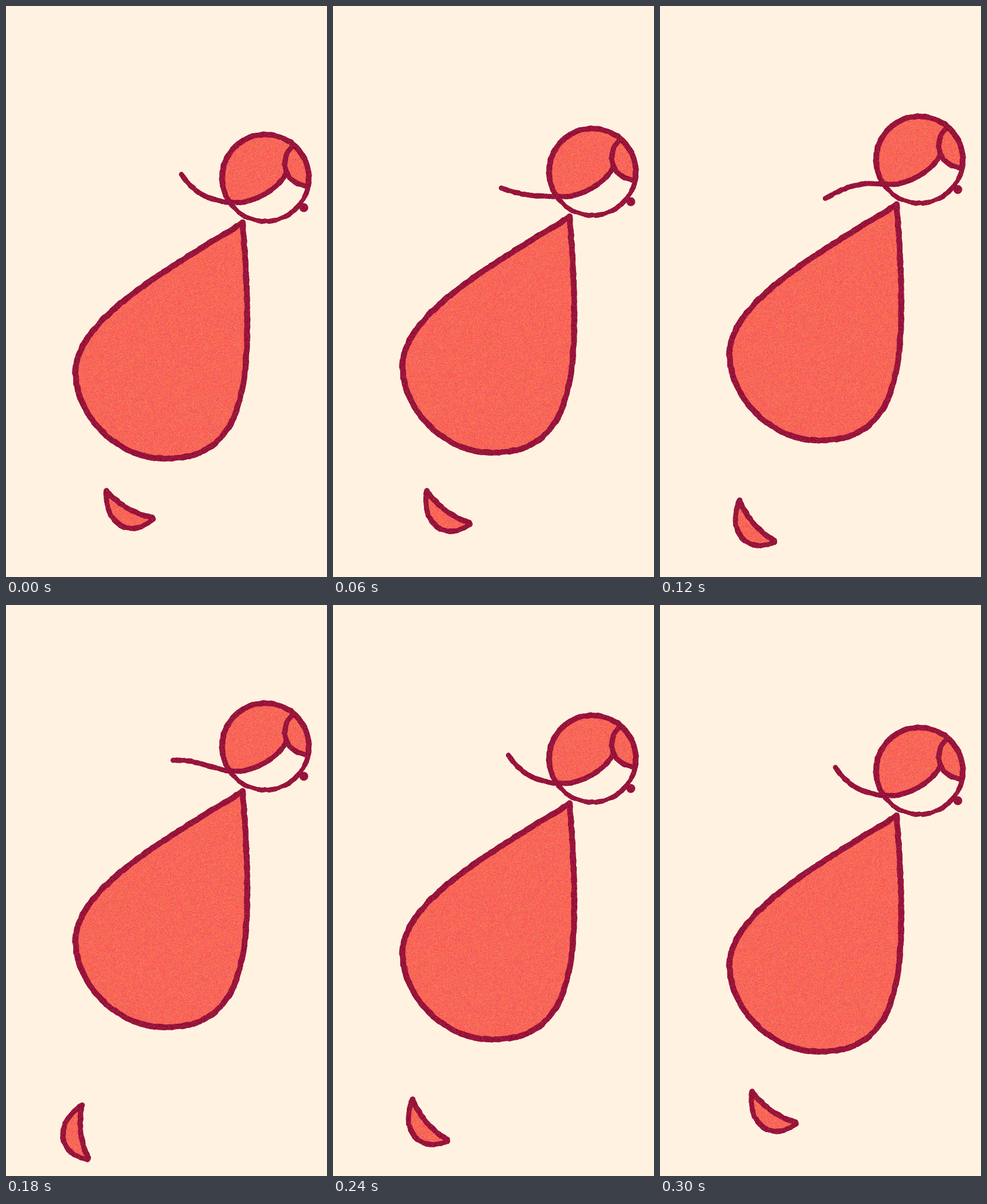
Write an HTML page with a canvas that moves like this. It is 540 px wide and 960 px high and loops after 0.36 s.

```html
<!DOCTYPE html>
<html lang="en">
<head>
<meta charset="utf-8">
<title>Bouncing figure</title>
<style>
  html, body { margin: 0; width: 100%; height: 100%; overflow: hidden; background: #fff2e0; }
  #stage { position: relative; width: 540px; height: 960px; overflow: hidden; }
  #strip { position: absolute; left: 0; top: 0; display: block; }
</style>
</head>
<body>
<div id="stage"><canvas id="strip"></canvas></div>
<script>
const W = 540, H = 960, STEP_MS = 60;
const INK = 'rgb(152,20,60)', FILL = 'rgb(253,102,88)';

// Ponytail curves, relative to the head
const TAIL_UP = 'M295 283 C310 309 340 328 376 330';
const TAIL_FLAT = 'M283 316 C310 327 345 331 376 330';
const TAIL_DOWN = 'M278 354 C310 336 330 326 376 330';
const TAIL_BACK = 'M281 312 C325 311 340 325 376 330';

// lift: height of head and body; foot: x, y, angle in degrees
const POSES = [
  { lift: 0,     tail: TAIL_UP,   foot: [169, 815, 29.4] },
  { lift: -10,   tail: TAIL_FLAT, foot: [158, 815, 36.1] },
  { lift: -30.5, tail: TAIL_DOWN, foot: [134, 831, 48.5] },
  { lift: -51,   tail: TAIL_BACK, foot: [128, 841, 82.5] },
  { lift: -30.5, tail: TAIL_UP,   foot: [134, 831, 48.5] },
  { lift: -10,   tail: TAIL_UP,   foot: [155, 818, 34.4] }
];

const BODY = 'M398 364 C300 428 117 520 117 616 C117 686 184 761 268 761 ' +
  'C372 761 406 690 406 530 C406 470 402 420 398 364 Z';
const HAIR = 'M376 330 A73 73 0 0 1 482 233 C459 258 463 270 470 283 C455 308 420 334 376 330 Z';
const LOCK = 'M482 235 C459 258 465 298 508 303 A73 73 0 0 0 482 235 Z';
const SKULL = 'M376 330 A73 73 0 1 1 508 303';
const CHIN = 'M508 303 A73 73 0 0 1 376 330';
const FRINGE = 'M376 330 C420 334 455 308 470 283';
const PARTING = 'M482 235 C459 258 465 298 508 303';
const FOOT = 'M0 0 C22 50 78 54 92 0 Q46 16 0 0 Z';

const strip = document.getElementById('strip');
strip.width = W * POSES.length;
strip.height = H;
const ctx = strip.getContext('2d', { willReadFrequently: true });
ctx.lineCap = ctx.lineJoin = 'round';

let seed = 1;
function rand() {
  seed = (seed + 0x6d2b79f5) | 0;
  let t = Math.imul(seed ^ (seed >>> 15), 1 | seed);
  t ^= t + Math.imul(t ^ (t >>> 7), 61 | t);
  return ((t ^ (t >>> 14)) >>> 0) / 4294967296;
}
const wobble = amount => (rand() * 2 - 1) * amount;

function fill(d, color = FILL) {
  ctx.fillStyle = color;
  ctx.fill(new Path2D(d));
}

// Short strokes with uneven width give the crayon edge
function rough(d, width) {
  const path = document.createElementNS('http://www.w3.org/2000/svg', 'path');
  path.setAttribute('d', d);
  const length = path.getTotalLength();
  const count = Math.max(2, Math.round(length / 6));
  const at = k => path.getPointAtLength(length * k / count);
  ctx.strokeStyle = INK;
  let { x, y } = at(0);
  for (let k = 1; k <= count; k++) {
    const p = at(k);
    const end = k === count;
    const nx = p.x + (end ? 0 : wobble(0.6));
    const ny = p.y + (end ? 0 : wobble(0.6));
    ctx.lineWidth = width + wobble(0.9);
    ctx.beginPath();
    ctx.moveTo(x, y);
    ctx.lineTo(nx, ny);
    ctx.stroke();
    x = nx;
    y = ny;
  }
}

function drawFoot([x, y, angle]) {
  ctx.save();
  ctx.translate(x, y);
  ctx.rotate(angle * Math.PI / 180);
  fill(FOOT);
  rough(FOOT, 8.6);
  ctx.restore();
}

function drawFigure({ lift, tail }) {
  ctx.save();
  ctx.translate(0, lift);
  fill(BODY);
  rough(BODY, 9.6);
  fill(HAIR);
  fill(LOCK);
  rough(CHIN, 7.6);
  rough(SKULL, 9.2);
  rough(FRINGE, 8.6);
  rough(PARTING, 8.6);
  fill('M493.5 339 a7.5 7.5 0 1 1 15 0 a7.5 7.5 0 1 1 -15 0 Z', INK);
  rough(tail, 8.2);
  ctx.restore();
}

function addGrain(left) {
  const image = ctx.getImageData(left, 0, W, H);
  const px = image.data;
  for (let i = 0; i < px.length; i += 4) {
    if (!px[i + 3]) continue;
    for (let c = 0; c < 3; c++) px[i + c] += wobble(18) + wobble(18);
  }
  ctx.putImageData(image, left, 0);
}

POSES.forEach((pose, i) => {
  seed = 7;
  ctx.save();
  ctx.translate(i * W, 0);
  drawFoot(pose.foot);
  drawFigure(pose);
  ctx.restore();
  seed = 99;
  addGrain(i * W);
});

strip.animate(
  [{ transform: 'translateX(0)' }, { transform: `translateX(${-strip.width}px)` }],
  { duration: STEP_MS * POSES.length, iterations: Infinity, easing: `steps(${POSES.length}, end)` }
);
</script>
</body>
</html>
```
